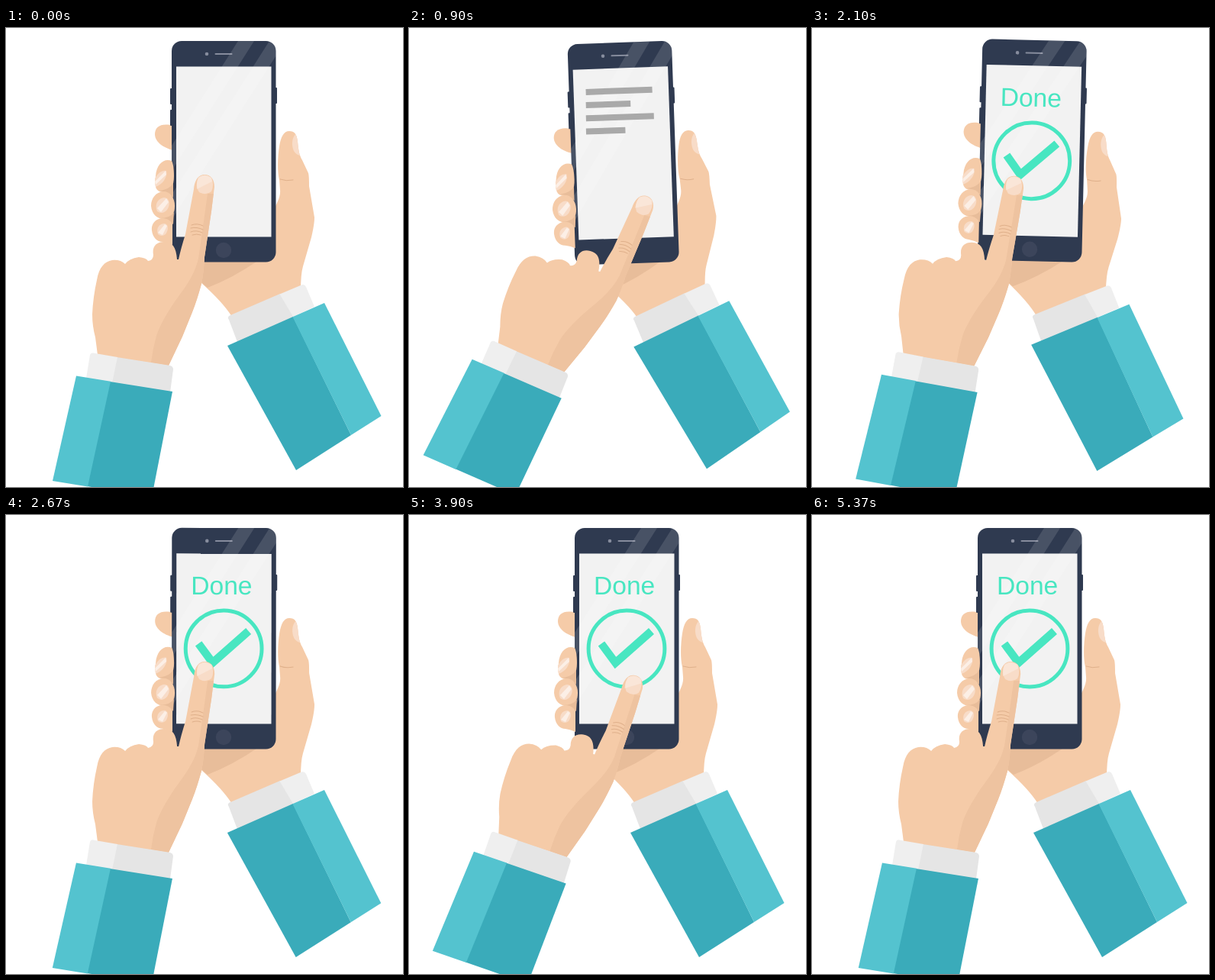
Animation of 520x601 px, one loop 5.4 s. Source, as an HTML page:

```html
<!DOCTYPE html>
<html lang="en">
<head>
<meta charset="utf-8">
<title>Phone tap</title>
<style>
  html, body { margin: 0; width: 100%; height: 100%; overflow: hidden; background: #fff; }
  svg { display: block; width: 100%; height: 100%; }
  .skin { fill: #f5cba8; }
  .shade { fill: #eec3a0; }
  .deep { fill: #e8bd9a; }
  .nail { fill: #f8dcc8; }
  .shine { fill: #fcefe6; }
  .teal { fill: #3aabba; }
  .aqua { fill: #54c3cf; }
  .cuff { fill: #e5e5e5; }
  .cuffLight { fill: #efefef; }
  .navy { fill: #2f3a50; }
  .line { fill: none; stroke: #dfb08b; stroke-width: 1; stroke-linecap: round; }
  .mint { fill: none; stroke: #48e6c1; }
  .done { font: 33.6px "Liberation Sans", Arial, sans-serif; fill: #48e6c1; }
</style>
</head>
<body>
<svg viewBox="0 0 520 601">
  <defs>
    <clipPath id="body"><rect x="217" y="17" width="136.500" height="289.500" rx="13"/></clipPath>
  </defs>

  <g id="holder">
    <!-- holding hand -->
    <path class="skin" d="M371 135C378 135 381 139 382 149C383 160 384 166 388 173L396 190Q397 193 397 207L404 248Q404 257 400 274L389 312Q386 322 386 345L296 378Q284 359 256 334V285L350 240C354 230 360 222 359 212L358 199C355 186 356 168 358 155C360 142 364 135 371 135Z"/>
    <path class="deep" d="M256 304H331Q296 328 264 340L256 333Z"/>
    <path class="nail" d="M379 139C374 145 374 154 377 161Q380 166 385 167C382 158 383 144 379 139Z"/>
    <path class="line" d="M359 198Q367 201 376 199"/>
    <path class="cuff" d="M292 382Q289 378 294 376L359 348L377 378L303 411Z"/>
    <path class="cuffLight" d="M358.500 348.500L387 336.500Q391 335 393 339L404 365L376 378Z"/>
    <path class="teal" d="M290 416L376 378L452 533L380 579Z"/>
    <path class="aqua" d="M375.500 378.300L417 360L491.500 508L452 533Z"/>
    <path class="skin" d="M219 128C204 124 195 129 195 139C195 149 206 157 219 160Z"/>

    <!-- phone -->
    <rect class="navy" x="215" y="79" width="4" height="21" rx="1"/>
    <rect class="navy" x="215" y="107" width="4" height="21" rx="1"/>
    <rect class="navy" x="351" y="78" width="4" height="21" rx="1"/>
    <rect class="navy" x="217" y="17" width="136.500" height="289.500" rx="13"/>
    <rect x="223" y="50.500" width="124.500" height="223" fill="#f2f2f2"/>
    <circle cx="263" cy="34" r="2.300" fill="#868c9d"/>
    <path d="M274.500 34H295.500" stroke="#868c9d" stroke-width="2" stroke-linecap="round"/>
    <circle cx="285" cy="291" r="10.200" fill="#3c455b"/>
    <path clip-path="url(#body)" fill="#fff" fill-opacity=".12" d="M304 17H325L217 187V154ZM345 17H366L217 251V218Z"/>

    <!-- screen -->
    <g id="bars" fill="#a9a9a9"></g>
    <circle id="ring" class="mint" cx="285" cy="175" r="49.900" stroke-width="5" pathLength="100" transform="rotate(-90 285 175)"/>
    <path id="check" class="mint" d="M252 168.500L270.500 193.500L317.500 152" stroke-width="10.500" pathLength="100"/>
    <text id="done" class="done" x="242" y="104">Done</text>

    <!-- gripping fingers -->
    <path class="skin" d="M217 174C207 170 197 178 196 194C194 207 196 215 206 215C216 214 220 207 220 194C220 184 219 178 217 174Z"/>
    <path class="deep" d="M201 213Q215 211 219 203L219 222Q210 214 201 213Z"/>
    <path class="skin" d="M206 214C196 215 190 223 190 233C191 244 198 250 207 250C217 249 221 243 221 233C221 222 215 214 206 214Z"/>
    <path class="deep" d="M202 249Q215 249 220 241L219 257Q211 250 202 249Z"/>
    <path class="skin" d="M205 249C195 250 190 257 191 265C192 274 198 280 205 280Q212 281 218 284V256Q213 249 205 249Z"/>
    <path class="nail" d="M195 197Q202 185 210 187C212 195 205 205 196 208Z"/>
    <path class="nail" d="M198 240C194 231 199 223 207 222C214 222 216 231 211 238Q205 245 198 240Z"/>
    <path class="nail" d="M199 270C196 262 201 256 208 256C213 257 213 265 209 270Q204 274 199 270Z"/>
    <path class="shine" d="M195 201L209 187L210 192L196 205ZM198 236L210 223L213 228L203 241ZM199 268L208 257L211 259L205 271Z"/>
  </g>

  <g id="tapper">
    <!-- tapping hand -->
    <path class="skin" d="M260 192C268 192 273 198 273 208L269 240L260 300Q259 320 256 335Q250 357 244 372L231 404L213 442L120 428L117 405Q113 390 113 375Q114 352 119 330C122 313 129 306 139 304Q150 303 156 309Q161 302 174 300Q184 301 186 305Q193 304 193 297C191 286 197 280 207 280C218 280 223 287 224 303L226 303Q229 289 235 270L246 211C247 199 252 192 260 192Z"/>
    <path class="shade" d="M264 217H271.800L269 240L260 300Q259 320 256 335Q250 357 244 372L231 404L213 442L190 438Q192 421 197 403C202 388 213 369 227 350C239 334 248 319 252 302Q258 261 264 217Z"/>
    <path class="nail" d="M252 196Q260 189 269 196Q273 205 269 214Q262 220 253 215C249 209 249 202 252 196Z"/>
    <path class="shine" fill-opacity=".55" d="M252 196Q260 190 269 196L270 201L250 211Q249 202 252 196Z"/>
    <path class="line" d="M243 258Q250 255 258 259M242 262Q250 260 258 264M242 267Q249 264 257 268M244 271Q250 269 255 271"/>
    <path class="cuff" d="M145 431L215 442Q219 443 219 447L215 477L138 465Z"/>
    <path class="cuffLight" d="M114 425.500L146 431L139 465L105 459L110 428Q111 425 114 425.500Z"/>
    <path class="teal" d="M136 463L218 476L191 614L106 600Z"/>
    <path class="aqua" d="M92 455.500L137 462.700L107 600.500L61 593Z"/>
  </g>
</svg>
<script>
const LOOP = 5400, STEP = 30;
const $ = id => document.getElementById(id);

// [time, degrees]
const tilt = [[0, 0], [900, -2], [1800, 2], [2700, 0], [LOOP, 0]];
const swing = [[0, 0], [900, 14.3], [1740, 1.9], [2700, 0]];
const widths = [87, 58.5, 89, 51.5];

const bars = widths.map((w, i) => {
  const bar = document.createElementNS('http://www.w3.org/2000/svg', 'rect');
  bar.setAttribute('x', 239 - i * 0.5);
  bar.setAttribute('y', 76.3 + i * 17.2);
  bar.setAttribute('height', 8);
  $('bars').append(bar);
  return bar;
});

const part = (t, from, to) => Math.min(1, Math.max(0, (t - from) / (to - from)));

function along(keys, t) {
  const i = Math.max(1, keys.findIndex(k => k[0] > t));
  const [a, x] = keys[i - 1], [b, y] = keys[i];
  return x + (y - x) * part(t, a, b);
}

const show = (el, on) => el.setAttribute('visibility', on ? 'visible' : 'hidden');

const spin = (el, deg, x, y) => el.setAttribute('transform', `rotate(${deg} ${x} ${y})`);

function trace(el, p) {
  show(el, p > 0);
  el.setAttribute('stroke-dasharray', p < 1 ? `${p * 100} 200` : 'none');
}

function draw(t) {
  spin($('holder'), along(tilt, t), 338, 293);
  spin($('tapper'), along(swing, t % 2700), 174.3, 407.5);
  bars.forEach((bar, i) => bar.setAttribute('width', widths[i] * part(t, i * 225, i * 225 + 225)));
  show($('bars'), t < 990);
  trace($('ring'), part(t, 1000, 1650));
  trace($('check'), part(t, 1680, 1860));
  show($('done'), t >= 1800);
}

const start = performance.now();
function tick() {
  const t = (performance.now() - start) % LOOP;
  draw(Math.floor(t / STEP) * STEP);
  requestAnimationFrame(tick);
}
draw(0);
requestAnimationFrame(tick);
</script>
</body>
</html>
```
